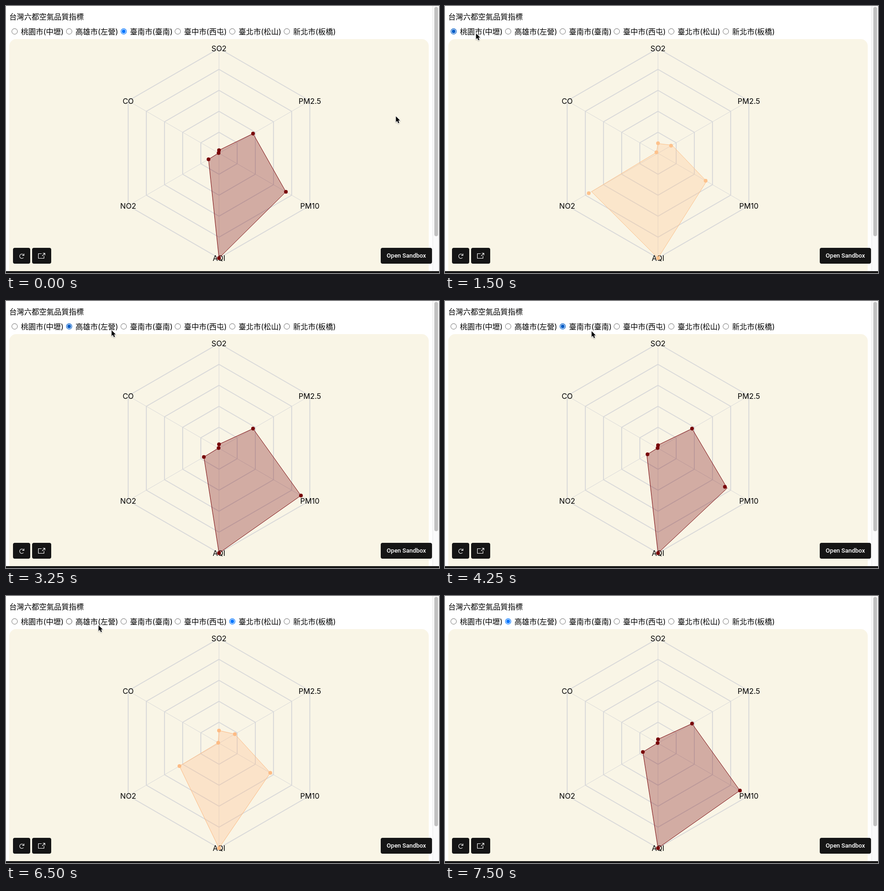
An HTML page with a canvas that plays this animation: 929 px wide and 573 px high, repeating every 8.25 s.

```html
<!DOCTYPE html>
<html lang="zh-Hant">
<head>
<meta charset="utf-8">
<title>台灣六都空氣品質指標</title>
<style>
  html, body { margin: 0; width: 100%; height: 100%; overflow: hidden; background: #fff; }
  canvas { display: block; }
</style>
</head>
<body>
<canvas id="stage" width="929" height="573"></canvas>
<script>
const ctx = document.getElementById('stage').getContext('2d');
const LOOP = 8250, STEP = 250, LAST = 7500, MORPH = 750;
const CX = 457, CY = 316, R = 225;
const FONT = 'Inter, "Noto Sans CJK TC", sans-serif';
const AXES = ['SO2', 'PM2.5', 'PM10', 'AQI', 'NO2', 'CO'];
const CITIES = ['桃園市(中壢)', '高雄市(左營)', '臺南市(臺南)', '臺中市(西屯)', '臺北市(松山)', '新北市(板橋)'];
const RADIO_X = [18.5, 135.5, 252.5, 368.5, 485.5, 602.5];

// Radii per axis, in pixels, keyed by city index
const DATA = {
  0: { color: '#fdc28c', values: [21.5, 32.3, 118, 225, 171.5, 4] },
  1: { color: '#780509', values: [8.5, 84.3, 203, 225, 37.5, 1] },
  2: { color: '#780509', values: [6.5, 84.3, 165.7, 225, 26, 1] },
  4: { color: '#fdbb84', values: [27.3, 39.2, 127, 225, 98, 2] }
};
const CLICKS = [
  { at: -MORPH, city: 2 }, { at: 920, city: 0 }, { at: 2511, city: 1 },
  { at: 3751, city: 2 }, { at: 5055, city: 4 }, { at: 6600, city: 1 }
];
// Pointer stops: time, x, y
const POINTER = [
  [0, 836, 236], [250, 780, 210], [750, 96, 66], [1000, 66, 58], [1750, 66, 58],
  [2500, 182, 61], [3000, 182, 61], [3750, 314, 64], [4500, 314, 64],
  [5000, 540, 55], [5500, 540, 55], [6250, 198, 62], [6750, 198, 62], [7250, 330, 240]
];

const lerp = (a, b, k) => a + (b - a) * k;
const easeCubic = k => k < 0.5 ? 4 * k ** 3 : 1 - 4 * (1 - k) ** 3;

function polar(axis, radius) {
  const a = axis * Math.PI / 3;
  return [CX + Math.sin(a) * radius, CY - Math.cos(a) * radius];
}

function trace(points) {
  ctx.beginPath();
  points.forEach(p => ctx.lineTo(...p));
  ctx.closePath();
}

function box(x, y, w, h, r, color) {
  ctx.fillStyle = color;
  ctx.beginPath();
  ctx.roundRect(x, y, w, h, r);
  ctx.fill();
}

function disc(x, y, r, color) {
  ctx.fillStyle = color;
  ctx.beginPath();
  ctx.arc(x, y, r, 0, 7);
  ctx.fill();
}

function text(str, x, y, align = 'left', font = '16px ' + FONT, color = '#000') {
  ctx.font = font;
  ctx.textAlign = align;
  ctx.fillStyle = color;
  ctx.fillText(str, x, y);
}

function strokePath(path, color, width) {
  ctx.strokeStyle = color;
  ctx.lineWidth = width;
  ctx.stroke(new Path2D(path));
}

function pointerAt(t) {
  const i = POINTER.findIndex(p => p[0] > t);
  if (i < 0) return t < LAST ? POINTER.at(-1).slice(1) : null;
  const [a, b] = [POINTER[i - 1], POINTER[i]];
  const k = (t - a[0]) / (b[0] - a[0]);
  return [lerp(a[1], b[1], k), lerp(a[2], b[2], k)];
}

function drawRadios(selected, pointer) {
  CITIES.forEach((name, i) => {
    const x = RADIO_X[i], y = 54.5;
    const hover = pointer && pointer[1] > 44 && pointer[1] < 68 &&
      pointer[0] > x - 7 && pointer[0] < x + 105;
    const on = i === selected;
    const color = on ? (hover ? '#005cc8' : '#0075ff') : (hover ? '#4f4f4f' : '#767676');
    disc(x, y, 6.5, color);
    disc(x, y, on ? 5.2 : 5.5, '#fff');
    if (on) disc(x, y, 3.9, color);
    text(name, x + 13.5, 61);
  });
}

function drawGrid() {
  ctx.strokeStyle = '#d9d9d9';
  ctx.lineWidth = 1;
  AXES.forEach((_, i) => {
    ctx.beginPath();
    ctx.moveTo(CX, CY);
    ctx.lineTo(...polar(i, R));
    ctx.stroke();
  });
  ctx.lineWidth = 2;
  for (let level = 1; level <= 5; level++) {
    trace(AXES.map((_, i) => polar(i, R * level / 5)));
    ctx.stroke();
  }
  AXES.forEach((name, i) => {
    const [x, y] = polar(i, R);
    text(name, x, y + 6, 'center');
  });
}

function drawRadar(from, to, k) {
  const { color, values } = DATA[to];
  const start = DATA[from].values;
  trace(values.map((v, i) => polar(i, lerp(start[i], v, k))));
  ctx.fillStyle = ctx.strokeStyle = color;
  ctx.globalAlpha = 0.3;
  ctx.fill();
  ctx.globalAlpha = 1;
  ctx.lineWidth = 1;
  ctx.stroke();
  values.forEach((v, i) => disc(...polar(i, v), 4, color));
}

function drawChrome() {
  box(915, 0, 14, 573, 0, '#fafafa');
  box(915, 0, 1, 573, 0, '#e8e8e8');
  box(919, 2, 8, 492, 4, '#c1c1c1');
  box(0, 569, 929, 4, 0, '#151515');
  [[15, 37], [56, 41], [804, 110]].forEach(([x, w]) => box(x, 519, w, 34, 4, '#151515'));
  strokePath('M37.6 540A4.7 4.7 0 1 1 37.8 534.2M38.6 531.6V535.4H34.6', '#fff', 1.1);
  strokePath('M76.5 531.5H69.5V541.5H81.5V536.5M79 530.5H83.5V535M83.5 530.5L77.5 536.5', '#fff', 1.1);
  text('Open Sandbox', 859, 540, 'center', '500 13px Roboto, sans-serif', '#fff');
}

function drawPointer([x, y]) {
  ctx.save();
  ctx.translate(x, y);
  ctx.lineJoin = 'round';
  const arrow = new Path2D('M.6 .8V13.2L3.4 10.6L5.5 15.6L7.7 14.6L5.6 9.8H9.4Z');
  ctx.shadowColor = 'rgba(0,0,0,.3)';
  ctx.shadowBlur = 2;
  ctx.shadowOffsetY = 1;
  ctx.strokeStyle = '#fff';
  ctx.lineWidth = 2;
  ctx.stroke(arrow);
  ctx.shadowColor = 'transparent';
  ctx.fillStyle = '#000';
  ctx.fill(arrow);
  ctx.restore();
}

function draw(now) {
  const t = Math.min(LAST, Math.floor(now % LOOP / STEP) * STEP);
  const current = CLICKS.findLastIndex(c => c.at <= t);
  const { at, city } = CLICKS[current];
  const previous = CLICKS[Math.max(0, current - 1)].city;
  const pointer = pointerAt(t);

  box(0, 0, 929, 573, 0, '#fff');
  text('台灣六都空氣品質指標', 7, 29);
  drawRadios(city, pointer);
  box(7, 71, 900, 520, 15, '#f9f5e6');
  drawGrid();
  drawRadar(previous, city, easeCubic(Math.min(1, (t - at) / MORPH)));
  drawChrome();
  if (pointer) drawPointer(pointer);
}

const began = performance.now();
(function tick() {
  draw(performance.now() - began);
  requestAnimationFrame(tick);
})();
</script>
</body>
</html>
```
